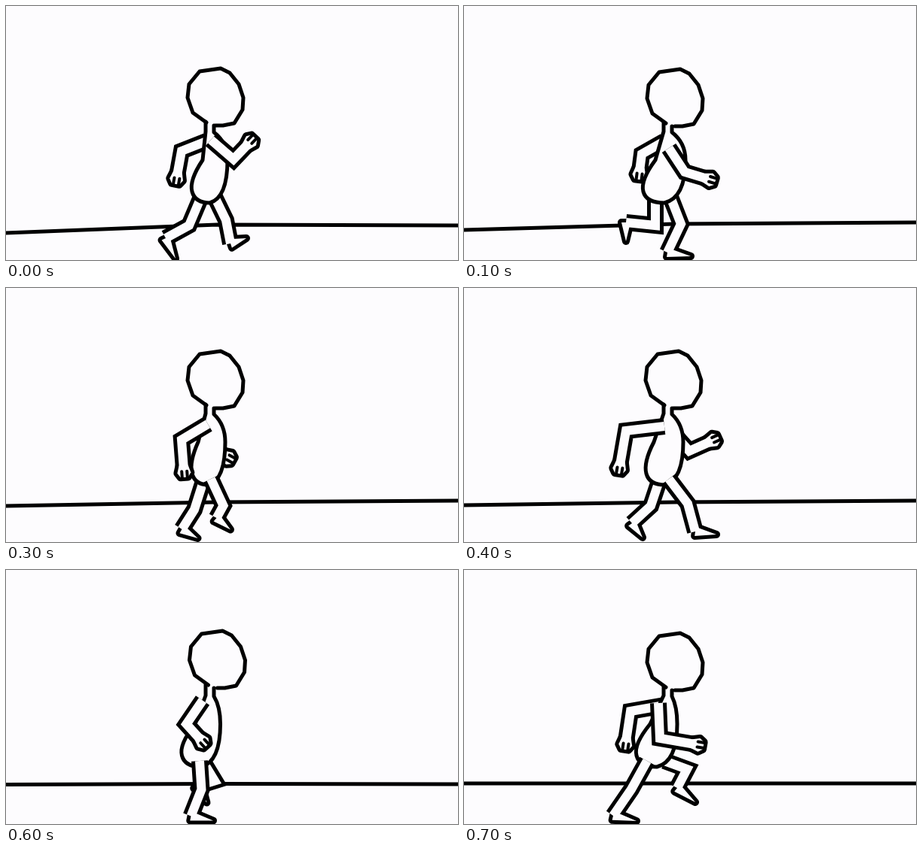
An HTML page with a canvas that plays this animation: 600 px wide and 338 px high, repeating every 0.8 s.

```html
<!DOCTYPE html>
<html lang="en">
<head>
<meta charset="utf-8">
<title>Run cycle</title>
<style>
html, body { margin: 0; height: 100%; overflow: hidden; background: #fdfcfe; }
canvas { display: block; width: 100%; height: 100%; }
</style>
</head>
<body>
<canvas width="600" height="338"></canvas>
<script>
const ctx = document.querySelector("canvas").getContext("2d");
const paper = "#fdfcfe", ink = "#000";
const hold = 100;
// Pose shown at each step; a half is the mean of its two neighbours.
const order = [0, 1, 2, 2.5, 3, 4, 4.5, 5];

// One row per key pose.
const ground = [ // y at left edge, middle and right edge
  [302, 291, 292], [298, 290, 288], [291, 285, 283],
  [289, 285, 283], [287, 285, 286], [284, 284, 284]];
const head = [[278, 121], [280, 122], [278, 122], [278, 122], [281, 116], [280, 122]];
const torso = [ // x of back, seat and chest
  [261, 247, 294], [254, 238, 294], [258, 252, 291],
  [252, 242, 291], [255, 238, 286], [247, 229, 283]];
const nearArm = [ // shoulder, elbow, hand
  [272, 178, 302, 204, 322, 183], [272, 189, 293, 221, 323, 230],
  [270, 178, 251, 214, 265, 246], [266, 184, 215, 190, 207, 236],
  [264, 170, 219, 186, 210, 220], [258, 177, 260, 224, 307, 232]];
const farArm = [ // elbow, hand
  [233, 193, 227, 226], [236, 197, 233, 220], [254, 215, 256, 245],
  [299, 217, 328, 204], [302, 214, 322, 173], [221, 188, 215, 228]];
const nearLeg = [ // hip x, knee, ankle, toe
  [259, 243, 292, 212, 309, 225, 336], [254, 254, 292, 215, 288, 215, 313],
  [272, 280, 292, 252, 288, 261, 315], [272, 297, 287, 307, 324, 335, 328],
  [271, 297, 292, 293, 328, 321, 333], [243, 222, 292, 198, 327, 229, 334]];
const farLeg = [
  [277, 292, 285, 298, 316, 319, 309], [274, 288, 290, 270, 328, 301, 333],
  [266, 252, 300, 244, 329, 272, 334], [260, 248, 290, 223, 313, 237, 332],
  [256, 258, 296, 226, 285, 226, 310], [266, 296, 265, 283, 290, 307, 309]];

const skull = "M-12 34L-30 21-37 1-35-17-21-34 7-38 19-32 31-17 37 1 36 17 25 35 10 38 0 38";
const palm = new Path2D("M-5-6L5-9 11-5 11 5 5 9-5 6Z");
const fingers = new Path2D("M3-4H12M3 3H12");

function at(rows, pose) {
  const a = rows[Math.floor(pose)], b = rows[Math.ceil(pose)];
  return a.map((v, i) => (v + b[i]) / 2);
}

function stroke(path, width = 5, color = ink) {
  ctx.lineWidth = width;
  ctx.strokeStyle = color;
  ctx.stroke(path);
}

function fill(path) {
  ctx.fillStyle = paper;
  ctx.fill(path);
}

// A jointed tube with an open top, merged with the shape at its end.
function limb(joints, end) {
  const bone = new Path2D("M" + joints.join(" "));
  ctx.lineCap = "butt";
  ctx.lineJoin = "miter";
  stroke(bone, 22);
  ctx.lineJoin = "round";
  stroke(end, 10);
  ctx.lineJoin = "miter";
  stroke(bone, 12, paper);
  fill(end);
  ctx.lineCap = ctx.lineJoin = "round";
}

function arm(joints) {
  const [ex, ey, hx, hy] = joints.slice(-4);
  const turn = new DOMMatrix().translate(hx, hy)
    .rotate(Math.atan2(hy - ey, hx - ex) * 180 / Math.PI);
  const place = path => {
    const p = new Path2D();
    p.addPath(path, turn);
    return p;
  };
  limb(joints, place(palm));
  stroke(place(fingers), 4);
}

function leg([hip, kx, ky, ax, ay, tx, ty]) {
  const d = Math.hypot(tx - ax, ty - ay) / 6;
  const nx = (ay - ty) / d, ny = (tx - ax) / d;
  const foot = new Path2D(`M${ax + nx} ${ay + ny}L${tx} ${ty} ${ax - nx} ${ay - ny}Z`);
  limb([hip, 254, kx, ky, ax, ay], foot);
}

function body([back, seat, chest], neck) {
  const path = new Path2D(`M265 ${neck}V167L${back} 205Q${seat - 4} 232 ${seat} 247
    Q${seat + 4} 262 ${(seat + chest) / 2} 262Q${chest} 255 ${chest} 205
    Q${chest} 182 276 168V${neck + 5}`);
  fill(path);
  stroke(path);
}

function draw() {
  const step = Math.floor(performance.now() / hold) % order.length;
  const pose = order[step];
  const [left, mid, right] = at(ground, pose);
  const [x, y] = at(head, pose);
  const front = at(nearLeg, pose);

  ctx.fillStyle = paper;
  ctx.fillRect(0, 0, 600, 338);
  ctx.lineCap = ctx.lineJoin = "round";
  stroke(new Path2D(`M0 ${left}L280 ${mid} 600 ${right}`));
  arm([266, 180, ...at(farArm, pose)]);
  leg(at(farLeg, pose));
  if (pose < 2) leg(front);
  body(at(torso, pose), y + 33);
  if (pose >= 2) leg(front);
  arm(at(nearArm, pose));
  ctx.translate(x, y);
  stroke(new Path2D(skull));
  ctx.resetTransform();
  requestAnimationFrame(draw);
}
draw();
</script>
</body>
</html>
```
